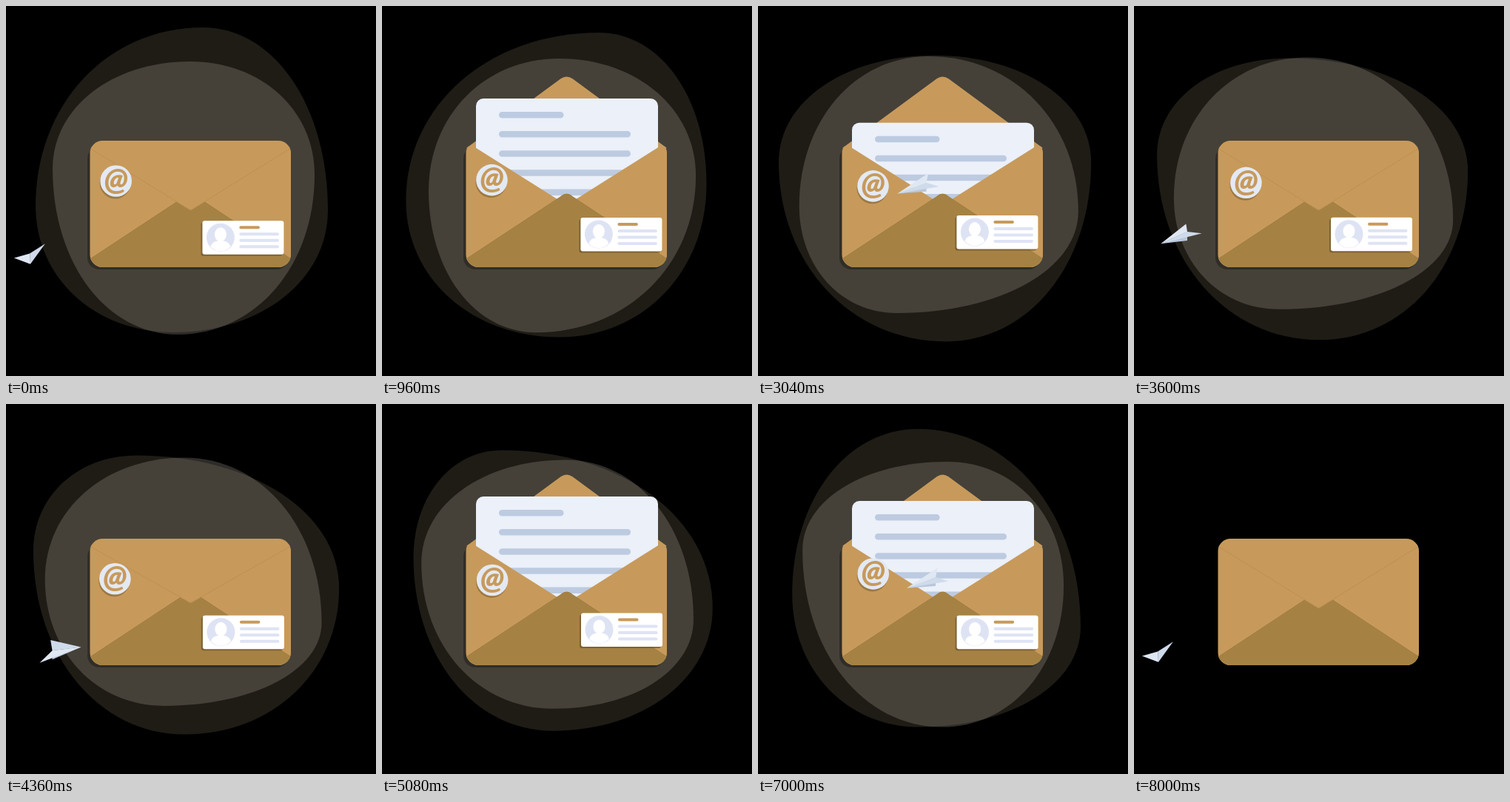
Animation, 500 px wide and 500 px high, one loop 8040 ms. Source, as an HTML page:

```html
<!DOCTYPE html>
<html lang="en">
<head>
<meta charset="utf-8">
<title>Mail</title>
<style>
  html, body { margin: 0; width: 100%; height: 100%; overflow: hidden; background: #000; }
  svg { display: block; width: 100vw; height: 100vh; }
  .at { font: italic 900 42px Lato, "Open Sans", sans-serif; fill: #c79a5b; text-anchor: middle; }
</style>
</head>
<body>
<svg viewBox="0 0 500 500">
  <defs>
    <clipPath id="body"><rect x="113.5" y="182" width="271.5" height="171" rx="17"/></clipPath>
  </defs>
  <g id="backdrop">
    <path id="outer" fill="#1f1c16"/>
    <path id="inner" fill="#b2a9a0" opacity=".26"/>
  </g>
  <g id="behind"></g>
  <rect id="shadow" x="110" y="190" width="272" height="166" rx="16" opacity=".3"/>
  <path id="flapOpen" fill="#c79a5b"/>
  <g clip-path="url(#body)"><path d="M114 192H385V353H114Z" fill="#8f6f3a"/></g>
  <g id="letter">
    <rect x="127" width="246" height="138" rx="10" fill="#ebf0f9"/>
    <g id="lines" fill="#bdcbe1"></g>
  </g>
  <g clip-path="url(#body)">
    <path d="M113 192 121 188 249.5 269 378 188 386 192V354H113Z" fill="#c79a5b"/>
    <path d="M112 343 241 258Q249.5 250 258 258L387 343V354H112Z" fill="#a58244" stroke="#a07c3f"/>
    <path id="flapClosed" fill="#c79a5b" stroke="#bc9053"/>
  </g>
  <g id="badge">
    <circle cx="-1" cy="3" r="21" fill="#93713c" opacity=".8"/>
    <circle r="21.3" fill="#e3e9f3"/>
    <text class="at" y="12">@</text>
  </g>
  <g id="card">
    <rect x="-2" y="2" width="110" height="45.5" rx="3" fill="#6b5129" opacity=".65"/>
    <rect width="110" height="45.5" rx="3" fill="#fff"/>
    <circle cx="24.5" cy="22.5" r="19" fill="#dee3f4"/>
    <ellipse cx="24.5" cy="18.5" rx="8" ry="9.5" fill="#fff"/>
    <path d="M11 35Q13 28 21 27H28Q36 28 38 35Q32 41 24.5 41T11 35Z" fill="#fff"/>
    <rect x="50" y="7" width="27.5" height="4" rx="2" fill="#c79a5b"/>
    <g id="bars" fill="#dee3f4"></g>
  </g>
  <g id="front">
    <g id="plane">
      <path id="keel" fill="#b9c6da"/>
      <path id="wingB" fill="#cfdaea"/>
      <path id="wingA" fill="#dfe7f2"/>
    </g>
  </g>
</svg>
<script>
const LOOP = 8040, CYCLE = 8000, HALF = 4000, STEP = 40;
const { sin, cos, PI, min, max, floor } = Math;
const el = id => document.getElementById(id);
const set = (id, name, value) => el(id).setAttribute(name, value);
const bar = (x, y, w, h) => `<rect x="${x}" y="${y}" width="${w}" height="${h}" rx="${h / 2}"/>`;

el('lines').innerHTML = [0, 1, 2, 3, 4].map(i => bar(158, 18 + 26.1 * i, i ? 178 : 87.5, 8.5)).join('');
el('bars').innerHTML = [0, 1, 2].map(i => bar(50, 16 + 8.5 * i, 53.5, 4)).join('');

// Eased 0..1 over a span of time
function ramp(t, start, length) {
  const u = min(1, max(0, (t - start) / length));
  return u < .5 ? 2 * u * u : 1 - 2 * (1 - u) ** 2;
}

// Smooth closed curve through its top, right, bottom and left extremes
function blob(top, right, bottom, left) {
  const k = .57;
  const mix = (a, b) => a + (b - a) * k;
  const acrossFirst = (a, b) => `C${mix(a[0], b[0])} ${a[1]} ${b[0]} ${mix(b[1], a[1])} ${b}`;
  const downFirst = (a, b) => `C${a[0]} ${mix(a[1], b[1])} ${mix(b[0], a[0])} ${b[1]} ${b}`;
  return `M${top}` + acrossFirst(top, right) + downFirst(right, bottom) +
    acrossFirst(bottom, left) + downFirst(left, top) + 'Z';
}

function drawBlobs(angle) {
  const c = cos(angle), s = sin(angle);
  set('outer', 'd', blob(
    [228 + 38 * c + 55 * s, 50 - 21 * c + 2 * s],
    [443 - 8 * c + 2 * s, 256 + 20 * c - 44 * s],
    [236 - 10 * c + 16 * s, 445 - 4 * c + 8 * s],
    [37 + 3 * c - 10 * s, 234 + 36 * c + 4 * s]));
  set('inner', 'd', blob(
    [243 + 6 * c - 12 * s, 73 + 2 * c - 5 * s],
    [423 - 6 * c + 8 * s, 261 - 33 * c - 11 * s],
    [218 + 14 * c - 30 * s, 426 + 18 * c + 3 * s],
    [58 + 5 * c + 2 * s, 234 - 14 * c + 38 * s]));
}

function drawFloaters(angle) {
  const x = 152.2 - 5 * cos(2 * angle - PI / 4);
  const y = 236.5 - 5 * cos(angle + .93) + 3 * cos(3 * angle);
  set('badge', 'transform', `translate(${x} ${y})`);
  const left = 268.6 - 3.2 * cos(2 * angle);
  const top = 284.3 + 4 * cos(2 * angle) + 2 * cos(angle);
  set('card', 'transform', `translate(${left} ${top})`);
}

function drawFlap(phase) {
  const tip = 276 - 183.5 * (ramp(phase, 325, 250) - ramp(phase, 3200, 250));
  const open = tip < 192;
  const round = open ? 8 : 2;
  const near = tip + (192 - tip) * round / 135.5;
  const point = `L${249.5 - round} ${near}Q249.5 ${tip} ${249.5 + round} ${near}L385 192`;
  const top = 192 - 10 * min(1, max(0, (tip - 192) / 40));
  set('flapOpen', 'd', open ? `M114 192${point}Z` : '');
  set('flapClosed', 'd', open ? '' : `M113 192${point}H386V${top - 1}H113Z`);
}

// A paper plane circling the envelope, turning at either end
function drawPlane(phase) {
  const turn = lag => 2 * PI * (phase - lag) / HALF;
  const x = 231 - 200 * cos(turn(60)), y = 258 + 78 * cos(turn(230));
  const leftTurn = ramp(phase, -650, 1400) + ramp(phase, HALF - 650, 1400);
  const heading = (160 - 165 * leftTurn - 195 * ramp(phase, 1860, 750)) * PI / 180;
  const c = cos(heading), s = sin(heading);

  const at = (dx, dy) => [x + dx, y + dy];
  const ahead = [52 * c, 18 * s - 13 * c];
  const side = [21 * s, -13 * c - 9.4 * s];
  const nose = at(...ahead);
  const fold = at(ahead[0] * .2, ahead[1] * .2);
  const shape = (id, corner) => set(id, 'd', `M${nose}L${fold}L${corner}Z`);
  shape('wingA', at(-side[0], -side[1]));
  shape('wingB', at(...side));
  shape('keel', [fold[0], fold[1] + 12]);

  const layer = el(phase > 200 && phase < 2300 ? 'behind' : 'front');
  if (el('plane').parentNode !== layer) layer.append(el('plane'));
}

function draw(t) {
  const phase = t % HALF, angle = 2 * PI * t / CYCLE;
  for (const id of ['backdrop', 'shadow', 'badge', 'card'])
    set(id, 'visibility', t >= CYCLE ? 'hidden' : 'visible');

  const raised = ramp(phase, 560, 240) - ramp(phase, 2970, 150);
  set('letter', 'transform', `translate(0 ${200 - 75 * raised})`);
  drawBlobs(angle);
  drawFloaters(angle);
  drawFlap(phase);
  drawPlane(phase);
}

function tick() {
  const t = performance.now() % LOOP;
  draw(floor(t / STEP) * STEP);
  requestAnimationFrame(tick);
}
tick();
</script>
</body>
</html>
```
